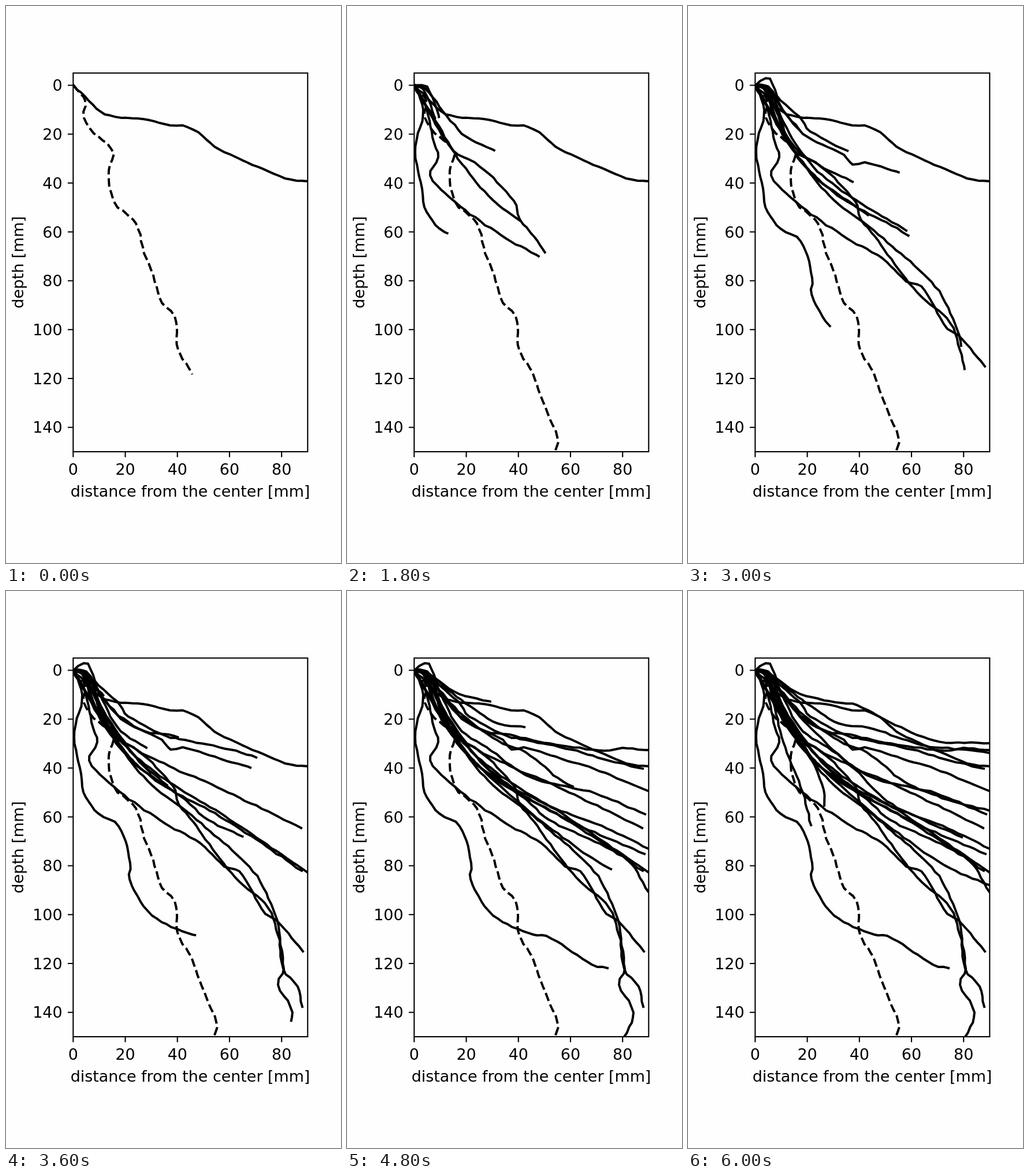
An HTML page for the animation above (6300 ms loop, 580 px wide and 966 px high).

```html
<!DOCTYPE html>
<html lang="en">
<head>
<meta charset="utf-8">
<title>Root growth</title>
<style>
  html, body { margin: 0; width: 100%; height: 100%; overflow: hidden; background: #fefefe; }
  svg { display: block; width: 580px; height: 966px; }
  text { font: 26.9px "DejaVu Sans", sans-serif; fill: #000; }
  .roots path { fill: none; stroke: #000; stroke-width: 4; stroke-linejoin: round; stroke-linecap: square; }
  .roots .dashed { stroke-dasharray: 14.8 6.4; stroke-linecap: butt; }
  .axes { fill: none; stroke: #000; stroke-width: 2.1; }
</style>
</head>
<body>
<svg viewBox="0 0 580 966">
  <clipPath id="plot"><rect x="116.3" y="116.3" width="406" height="656.7"/></clipPath>
  <g class="roots" clip-path="url(#plot)"></g>
  <rect class="axes" x="116.3" y="116.3" width="406" height="656.7"/>
  <path class="axes" id="ticks"/>
  <g id="labels"></g>
</svg>
<script>
const LOOP = 6300, STEP = 300;
const NS = 'http://www.w3.org/2000/svg';
const LEFT = 116.3, ZERO_Y = 137.5, BOTTOM = 773, TICK = 9.4;
const ORIGIN = [117, ZERO_Y];
const SPACING = 11, WIGGLE = 1.1;
const rootLayer = document.querySelector('.roots');
const labels = document.getElementById('labels');
const roots = [];

let seed = 7;
function random() {
  seed = (seed * 16807) % 2147483647;
  return seed / 2147483647;
}

function add(parent, tag, attrs, content = '') {
  const el = document.createElementNS(NS, tag);
  for (const key in attrs) el.setAttribute(key, attrs[key]);
  el.textContent = content;
  parent.append(el);
  return el;
}

function drawAxes() {
  let d = '';
  for (let mm = 0; mm <= 80; mm += 20) {
    const x = LEFT + mm * 4.511;
    d += `M${x} ${BOTTOM}v${TICK}`;
    add(labels, 'text', { x, y: 812.5, 'text-anchor': 'middle' }, mm);
  }
  for (let mm = 0; mm <= 140; mm += 20) {
    const y = ZERO_Y + mm * 4.237;
    d += `M${LEFT} ${y}h${-TICK}`;
    add(labels, 'text', { x: 97.5, y: y + 9.8, 'text-anchor': 'end' }, mm);
  }
  document.getElementById('ticks').setAttribute('d', d);
  add(labels, 'text', { x: 319, y: 851, 'text-anchor': 'middle' }, 'distance from the center [mm]');
  add(labels, 'text', { transform: 'translate(29.5 444.5) rotate(-90)', 'text-anchor': 'middle' }, 'depth [mm]');
}

const distance = (a, b) => Math.hypot(b[0] - a[0], b[1] - a[1]);

// A smooth curve through the key points, sampled evenly and roughened a little.
function organicCurve(keys) {
  const tangents = keys.map((_, i) => {
    const a = keys[Math.max(i - 1, 0)], b = keys[Math.min(i + 1, keys.length - 1)];
    return [0, 1].map(j => (b[j] - a[j]) / distance(a, b));
  });
  const points = [keys[0]];
  for (let i = 1; i < keys.length; i++) {
    const size = distance(keys[i - 1], keys[i]);
    const count = Math.ceil(size / SPACING);
    for (let n = 1; n <= count; n++) {
      const t = n / count, s = 1 - t;
      const rough = n < count ? WIGGLE : 0;
      points.push([0, 1].map(j =>
        keys[i - 1][j] * s * s * (1 + 2 * t) + keys[i][j] * t * t * (3 - 2 * t) +
        size * s * t * (tangents[i - 1][j] * s - tangents[i][j] * t) +
        rough * (2 * random() - 1)));
    }
  }
  return points;
}

// Grows at constant speed from step `born` until its whole path is drawn at step `grown`.
function root(born, grown, path) {
  const keys = path.split(' ').map(pair => pair.split(',').map(Number));
  const points = organicCurve([ORIGIN, ...keys]);
  let total = 0;
  for (let i = 1; i < points.length; i++) total += distance(points[i - 1], points[i]);
  const el = add(rootLayer, 'path', {});
  roots.push({ born, grown, points, total, el });
  return el;
}

// Later roots first run flat through the crown, then turn down.
function crownRoot(born, grown, path) {
  return root(born, grown, `${130 + 10 * random()},${139 + 5 * random()} ${path}`);
}

function grownPath({ born, grown, points, total }, step) {
  let left = total * Math.min(1, (step - born) / (grown - born));
  if (left <= 0) return '';
  let d = 'M' + points[0];
  for (let i = 1; i < points.length; i++) {
    const a = points[i - 1], b = points[i], size = distance(a, b);
    const k = Math.min(1, left / size);
    d += `L${a[0] + (b[0] - a[0]) * k} ${a[1] + (b[1] - a[1]) * k}`;
    left -= size;
    if (left <= 0) break;
  }
  return d;
}

// First pair
root(-8, 0, '137,157 171,188 237,196 284,207 306,207 340,225 361,244 417,271 474,295 503,303 522,304');
root(-8, 2, '137,164 135,194 152,221 175,238 187,256 178,285 188,341 225,377 239,429 251,457 270,515 292,538 298,596 316,627 344,697 366,756 360,773')
  .classList.add('dashed');

// Deep roots
root(0, 15, '132,180 118,253 130,317 134,349 160,386 195,408 215,472 214,500 253,563 323,596 345,598 424,648 451,654');
root(0, 10, '138,180 151,238 158,262 144,294 205,354 275,403 336,437 378,478 404,486 449,560 468,571 514,625');
root(0, 12.5, '184,251 221,271 289,338 299,370 324,400 345,431 404,504 448,541 466,577 481,655 471,683 496,731 480,773');
root(1.8, 12, '142,180 199,274 253,337 314,383 414,471 440,504 470,572 480,655 505,686 513,721');

// Shallow roots
root(0, 15.5, '135,143 167,184 207,227 270,258 285,275 306,271 371,291 429,309 522,347');
root(7.3, 13, '125,130 142,126 154,156 192,191 212,218 276,251 300,257 388,275 434,289 512,308');
crownRoot(8, 16, '182,204 212,227 240,243 290,251 330,261 445,277 477,272 522,276');
crownRoot(14, 18, '205,195 262,230 312,237 410,268 480,275 522,281');
crownRoot(14, 20, '185,174 255,193 293,198 350,228 425,259 522,264');

// Middle fan
crownRoot(5, 12, '180,245 251,322 389,402 512,485');
crownRoot(5.7, 12, '175,220 217,279 285,333 380,391 522,488');
crownRoot(4.8, 14.6, '168,229 218,294 312,363 350,397 410,426 485,466 522,522');
crownRoot(8, 12, '185,245 283,304 345,330 511,411');
crownRoot(9.4, 16, '193,236 242,271 318,323 430,351 516,387');
crownRoot(9, 17, '200,270 280,352 400,447 463,485 522,510');
crownRoot(9, 16, '160,195 245,310 340,368 450,412 522,447');
crownRoot(9, 15, '155,205 270,330 400,405 515,456');
crownRoot(11, 18, '200,215 270,265 310,280 375,331 450,362 522,381');

// Late roots
crownRoot(16, 20, '148,193 165,262 199,350 213,406');
crownRoot(16, 20, '155,195 200,265 235,345 236,372');
crownRoot(16, 20, '200,225 290,310 345,365 400,393 474,427');

let shown = -1;
function render(now) {
  const step = Math.floor((now % LOOP) / STEP);
  if (step !== shown) {
    shown = step;
    for (const r of roots) r.el.setAttribute('d', grownPath(r, step));
  }
  requestAnimationFrame(render);
}

drawAxes();
render(performance.now());
</script>
</body>
</html>
```
